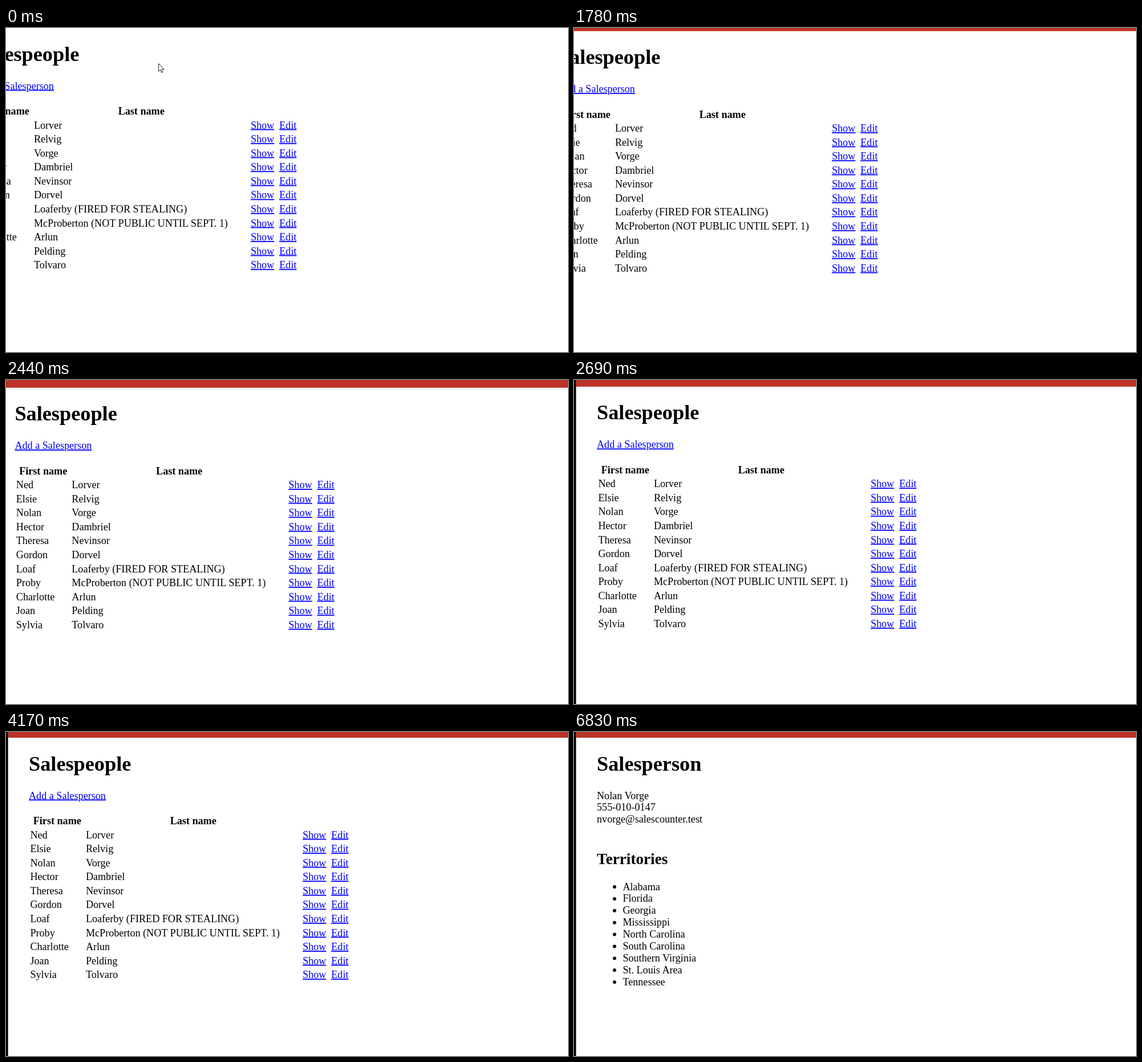
These frames come from a looping animation (985 by 569 pixels, 8000 ms). An HTML page:

```html
<!DOCTYPE html>
<html lang="en">
<head>
<meta charset="utf-8">
<title>Salespeople</title>
<style>
  html, body { margin: 0; width: 100%; height: 100%; overflow: hidden; background: #fff; }
  svg { display: block; width: 985px; height: 569px; }
  text { font: 18.14px "Liberation Serif", "Times New Roman", serif; fill: #000; white-space: pre; }
  .h1 { font-size: 2em; font-size: 36.28px; font-weight: bold; }
  .h2 { font-size: 27.2px; font-weight: bold; }
  .th { font-weight: bold; text-anchor: middle; }
  .link { fill: #00f; text-decoration: underline; }
</style>
</head>
<body>
<svg viewBox="0 0 985 569">
  <g id="view">
    <rect x="3.6" y="-40" width="1200" height="50" fill="#bd3226"/>
    <rect x="-200" y="-40" width="203.6" height="700"/>
    <g id="list"></g>
    <g id="detail"></g>
  </g>
  <path id="cursor" d="M.5 .5V14.2L3.6 11.4L5.9 16.4L7.9 15.5L5.7 10.6H10.1Z" fill="#fff" stroke="#1c1c28"/>
</svg>
<script>
const LOOP = 8000, TICK = 135, SWITCH = 5550;
const LEFT = 40, ROW = 24.57, LINE = 20.9;
const $ = id => document.getElementById(id);
const view = $('view'), list = $('list'), detail = $('detail'), cursor = $('cursor');

function add(parent, tag, attrs, content = '') {
  const el = document.createElementNS('http://www.w3.org/2000/svg', tag);
  for (const key in attrs) el.setAttribute(key, attrs[key]);
  el.textContent = content;
  parent.append(el);
}
const write = (parent, x, y, content, style = '') =>
  add(parent, 'text', { x, y, class: style }, content);

const people = [
  ['Ned', 'Lorver'], ['Elsie', 'Relvig'], ['Nolan', 'Vorge'], ['Hector', 'Dambriel'],
  ['Theresa', 'Nevinsor'], ['Gordon', 'Dorvel'], ['Loaf', 'Loaferby (FIRED FOR STEALING)'],
  ['Proby', 'McProberton (NOT PUBLIC UNTIL SEPT. 1)'], ['Charlotte', 'Arlun'],
  ['Joan', 'Pelding'], ['Sylvia', 'Tolvaro']
];
const contact = ['Nolan Vorge', '555-010-0147', 'nvorge@salescounter.test'];
const areas = ['Alabama', 'Florida', 'Georgia', 'Mississippi', 'North Carolina',
  'South Carolina', 'Southern Virginia', 'St. Louis Area', 'Tennessee'];

write(list, LEFT, 67.5, 'Salespeople', 'h1');
write(list, LEFT, 117.5, 'Add a Salesperson', 'link');
write(list, 89.8, 162, 'First name', 'th');
write(list, 328.2, 162, 'Last name', 'th');
people.forEach(([first, last], i) => {
  const y = 162 + ROW * (i + 1);
  write(list, 42.4, y, first);
  write(list, 139.9, y, last);
  write(list, 519.9, y, 'Show', 'link');
  write(list, 570, y, 'Edit', 'link');
});

write(detail, LEFT, 67.5, 'Salesperson', 'h1');
contact.forEach((line, i) => write(detail, LEFT, 117.5 + i * LINE, line));
write(detail, LEFT, 232, 'Territories', 'h2');
areas.forEach((area, i) => {
  const y = 277.5 + i * LINE;
  add(detail, 'circle', { cx: 71, cy: y - 5.5, r: 3 });
  write(detail, 85.4, y, area);
});

// Key points are [ms, x, y].
const pan = [
  [1370, -91, -10], [1780, -68, -4.5], [2180, -41, -2], [2310, -41, -2],
  [2440, -24.6, 3.6], [2690, 0, 1.7], [2840, 0, 0]
];
const trips = [
  { from: 0, to: 1260, path: [[130, 267, 62], [260, 263, 57], [410, 244, -1], [1260, 242, -10]] },
  { from: 3390, to: 4170, path: [[3390, 285, 41], [3510, 340, 86], [3900, 412, 274], [4020, 412, 243]] },
  { from: 6140, to: 6830, path: [[6140, 353, 127], [6290, 342, 128], [6450, 242, 55], [6710, 265, -6]] }
];

// Linear between key points, advancing in jumps of about one TICK.
function along(path, t) {
  const next = path.findIndex(key => key[0] > t);
  if (next < 1) return path.at(next).slice(1);
  const [t0, ...a] = path[next - 1], [t1, ...b] = path[next];
  const steps = Math.max(1, Math.round((t1 - t0) / TICK));
  const p = Math.floor((t - t0) / (t1 - t0) * steps) / steps;
  return a.map((v, i) => v + (b[i] - v) * p);
}
const move = (el, [x, y]) => el.setAttribute('transform', `translate(${x} ${y})`);
const show = (el, on) => el.setAttribute('visibility', on ? 'visible' : 'hidden');

function draw(t) {
  const trip = trips.find(({ from, to }) => t >= from && t < to);
  move(view, along(pan, t));
  show(list, t < SWITCH);
  show(detail, t >= SWITCH);
  show(cursor, trip);
  if (trip) move(cursor, along(trip.path, t).map(Math.round));
}

const start = performance.now();
function tick() {
  draw((performance.now() - start) % LOOP);
  requestAnimationFrame(tick);
}
tick();
</script>
</body>
</html>
```
